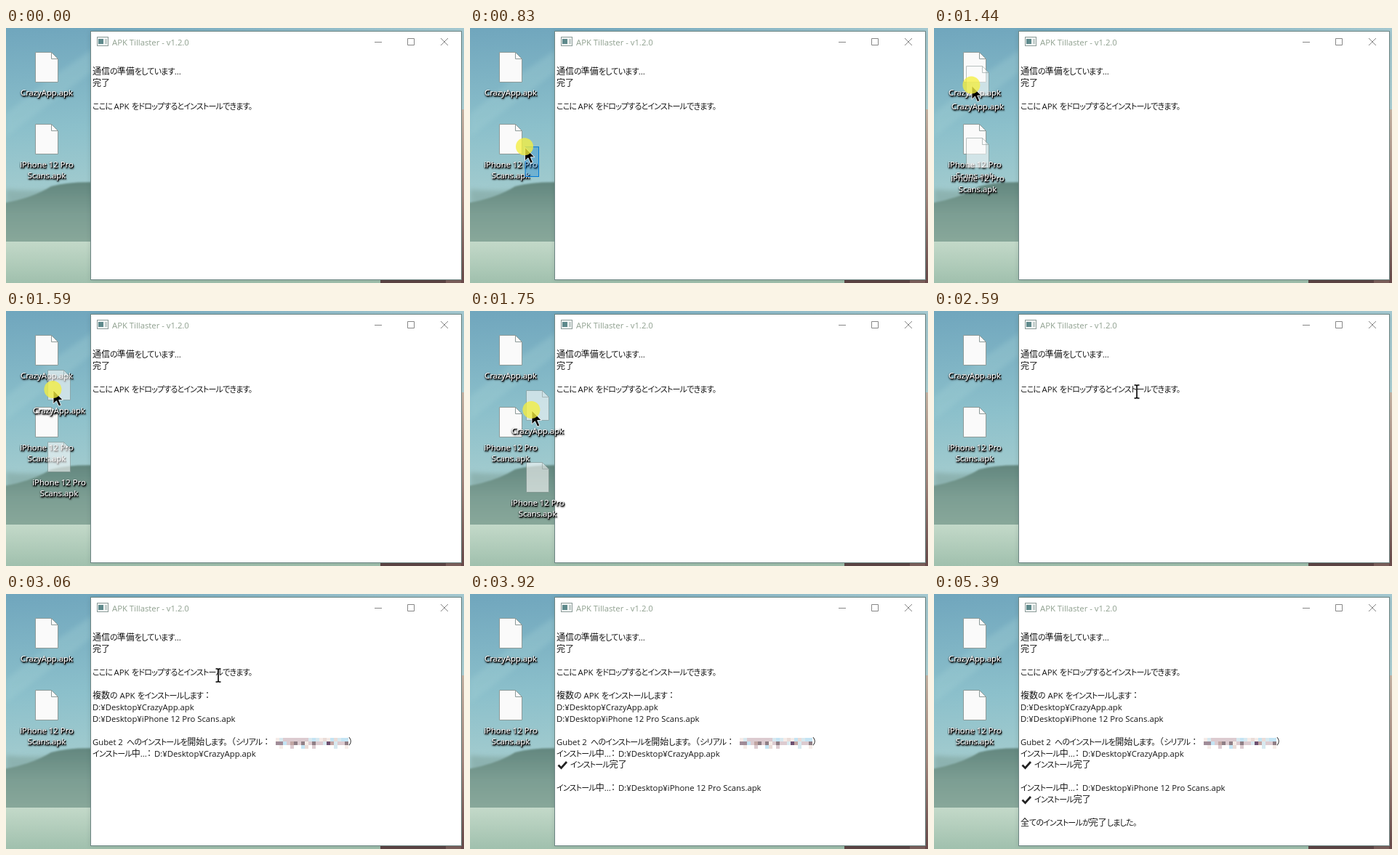
Animation, 630 px wide and 351 px high, one loop 7390 ms. Source, as an HTML page:

```html
<!DOCTYPE html>
<html lang="ja">
<head>
<meta charset="utf-8">
<title>Drag and drop install</title>
<style>
html, body { margin: 0; width: 100%; height: 100%; overflow: hidden; }
svg { display: block; width: 630px; height: 351px; }
text { font: 11.3px 'Open Sans', 'Noto Sans CJK JP', 'Noto Sans CJK', sans-serif; white-space: pre; }
.log text { fill: #161616; }
.kanji { font-size: 12px; }
.kana { font-size: 11px; letter-spacing: -.82px; font-feature-settings: 'palt'; }
.label text {
  fill: #fff; stroke: #fff; stroke-width: .2; text-anchor: middle;
  filter: drop-shadow(1px 1px .6px #000) drop-shadow(.5px 1px 1px #000);
}
#ghost path { opacity: .6; }
</style>
</head>
<body>
<svg id="stage" viewBox="0 0 630 351"></svg>
<script>
const LOOP = 7390, START = 590, TICK = 77.3;

const wrapRuns = s => s
  .replace(/[ぁ-ヿ。]+/g, '<tspan class="kana">$&</tspan>')
  .replace(/[一-龥：（）]+/g, '<tspan class="kanji">$&</tspan>');

// One log line: baseline, then pairs of x and text.
function line(y, ...parts) {
  let out = '';
  for (let i = 0; i < parts.length; i += 2)
    out += `<text x="${parts[i]}" y="${y}">${wrapRuns(parts[i + 1])}</text>`;
  return out;
}

const check = y => `<path d="M121.5 ${y} l4 4 l7.5 -8.5" fill="none" stroke="#222" stroke-width="2.7"/>`;

function file(y, ...names) {
  const page = `<path d="M40.5 ${y + .5} h22 l9 9 v32 h-31 z" fill="#fafafa" stroke="#8d9a98"/>
    <path d="M62.5 ${y + .5} v9 h9" fill="none" stroke="#8d9a98"/>`;
  return page + names.map((n, i) => `<text x="56" y="${y + 59.5 + i * 15}">${n}</text>`).join('');
}

function mosaic() {
  const light = ['#f5ece8', '#d8e9f0', '#eadcd8', '#c4e4f4', '#dccbd0'];
  const dark = ['#a08c98', '#8f7f86', '#c2a6a4', '#6d5070'];
  let seed = 41, out = '';
  const rnd = () => (seed = seed * 16807 % 2147483647) / 2147483647;
  for (let row = 0; row < 3; row++)
    for (let col = 0; col < 20; col++) {
      const tones = row === 1 && rnd() < .6 ? dark : light;
      const tone = tones[Math.floor(rnd() * tones.length)];
      if (row < 2 || rnd() < .15)
        out += `<rect x="${371 + col * 5}" y="${198 + row * 5}" width="5" height="5" fill="${tone}"/>`;
    }
  return out;
}

const files = file(33, 'CrazyApp.apk') + file(132, 'iPhone 12 Pro', 'Scans.apk');
const pathA = 'D:¥Desktop¥CrazyApp.apk', pathB = 'D:¥Desktop¥iPhone 12 Pro Scans.apk';
const arrow = 'M0 0 V17 L4 13.3 L7 20 L9.8 18.8 L7 12.3 H12 Z';

stage.innerHTML = `
<defs>
  <linearGradient id="sky" x1="0" y1="0" x2=".08" y2="1">
    <stop offset="0" stop-color="#70a6bd"/><stop offset=".4" stop-color="#8cc0cb"/>
    <stop offset=".65" stop-color="#a2cbce"/><stop offset="1" stop-color="#a9cdca"/>
  </linearGradient>
  <linearGradient id="haze">
    <stop offset=".2" stop-color="#d5e8e4" stop-opacity="0"/><stop offset="1" stop-color="#d5e8e4" stop-opacity=".5"/>
  </linearGradient>
  <linearGradient id="hill" x1="0" y1="0" x2="0" y2="1">
    <stop offset="0" stop-color="#63877f"/><stop offset=".5" stop-color="#7c9e93"/><stop offset="1" stop-color="#8aa99b"/>
  </linearGradient>
  <linearGradient id="water" x1="0" y1="0" x2="0" y2="1">
    <stop offset="0" stop-color="#c3d9c9"/><stop offset="1" stop-color="#a0c0ad"/>
  </linearGradient>
  <linearGradient id="edge" x1="0" y1="0" x2="0" y2="1">
    <stop offset="0" stop-color="#cdb8a8"/><stop offset=".5" stop-color="#a98a80"/><stop offset="1" stop-color="#6b4a4a"/>
  </linearGradient>
  <filter id="soft"><feGaussianBlur stdDeviation="3"/></filter>
  <filter id="blur"><feGaussianBlur stdDeviation="1"/></filter>
</defs>
<rect width="630" height="351" fill="url(#sky)"/>
<rect width="630" height="351" fill="url(#haze)"/>
<path d="M0 118 L60 70 L118 30 V60 L50 112 L0 150 Z" fill="#a5d2d6" opacity=".3" filter="url(#soft)"/>
<path d="M0 222 Q50 228 130 214 V300 H0 Z" fill="#7fa39d" opacity=".6" filter="url(#soft)"/>
<path d="M-9 242 Q35 235 62 218 Q90 210 140 213 V300 H-9 Z" fill="url(#hill)" filter="url(#blur)"/>
<rect y="294" width="630" height="57" fill="url(#water)"/>
<rect x="515" y="346" width="90" height="5" fill="#5d4444"/>
<rect x="605" y="346" width="25" height="5" fill="#7d5f5b"/>
<rect x="626" y="112" width="4" height="239" fill="url(#edge)"/>
<g class="label">${files}</g>

<rect x="116" y="5" width="512" height="343" fill="#203030" opacity=".15" filter="url(#soft)"/>
<rect x="116.5" y="4.5" width="510" height="342" fill="#fff" stroke="#6d8583"/>
<rect x="125.5" y="12.5" width="15" height="12" fill="#f2f5f4" stroke="#8b9b98"/>
<rect x="127" y="15" width="7" height="7" fill="#5f8a8c"/>
<rect x="136" y="15" width="3" height="7" fill="#c3cecc"/>
<text x="146" y="24" fill="#8fa08f">APK Tillaster - v1.2.0</text>
<path d="M507 19.5 h10 M552.5 14.5 h9 v9 h-9 z M598 14 l10 10 M608 14 l-10 10" fill="none" stroke="#868686"/>

<g class="log">
  ${line(64, 119, '通信の準備をしています...')}
  ${line(80, 119, '完了')}
  ${line(112, 119, 'ここに', 148.5, 'APK', 173, 'をドロップするとインストールできます。')}
  <g id="begin">
    ${line(144, 119, '複数の', 156.5, 'APK', 181, 'をインストールします：')}
    ${line(160, 119, pathA)}
    ${line(176, 119, pathB)}
    ${line(208, 119, 'Gubet 2', 166, 'へのインストールを開始します。', 304, '（シリアル：', 471, '）')}
    ${mosaic()}
    ${line(224, 119, 'インストール中...', 191, '：', 204, pathA)}
  </g>
  <g id="second">
    ${check(235.5)}${line(239, 138, 'インストール完了')}
    ${line(271, 119, 'インストール中...', 191, '：', 204, pathB)}
  </g>
  <g id="done">
    ${check(283.5)}${line(287, 138, 'インストール完了')}
    ${line(319, 119, '全てのインストールが完了しました。')}
  </g>
</g>

<rect id="band" fill="#0078d7" fill-opacity=".28" stroke="#0078d7"/>
<g id="ghost" class="label">${files}</g>
<g id="pointer">
  <path id="dark" d="${arrow}" transform="translate(0 1) scale(1.1)" fill="#000" stroke="#fff" stroke-width=".8"/>
  <g id="copy">
    <path d="${arrow}" fill="#fff" stroke="#000"/>
    <rect x="3.5" y="15.5" width="11" height="8" fill="none" stroke="#000" stroke-width="1.6" stroke-dasharray="1.5 1.5"/>
    <rect x="10.5" y="19.5" width="10" height="10" fill="#fff" stroke="#000"/>
    <path d="M15.5 21.5 v6 M12.5 24.5 h6" stroke="#000" stroke-width="1.2"/>
  </g>
  <path id="beam" d="M-3.5 -9 H-1 L0 -8 L1 -9 H3.5 M0 -8 V8 M-3.5 9 H-1 L0 8 L1 9 H3.5" fill="none" stroke="#000" stroke-width="1.6"/>
  <circle id="press" cx="-.6" r="12" fill="#f4ee40" opacity=".78"/>
</g>`;

// Pointer poses: tick, x, y.
const poses = [
  [0, 94, 204], [2, 88, 190], [7, 26, 56], [9, 19, 41],
  [10, 48, 61.5], [11, 52, 78.5], [13, 65, 108], [15, 85, 136], [16, 99, 139],
  [17, 134, 138], [18, 180, 131], [19, 222, 122], [20, 248, 116], [21, 269, 112], [22, 279, 111],
  [31, 279, 111], [32, 292, 112], [33, 345, 111], [34, 425, 109], [35, 505, 107],
  [36, 553, 106], [37, 553, 106], [38, 608, 110]
];

function poseAt(k) {
  const i = poses.findIndex(p => p[0] >= k);
  if (i < 0) return poses[poses.length - 1].slice(1);
  if (i === 0) return poses[0].slice(1);
  const [ka, xa, ya] = poses[i - 1], [kb, xb, yb] = poses[i];
  const u = (k - ka) / (kb - ka);
  return [xa + (xb - xa) * u, ya + (yb - ya) * u];
}

const el = id => document.getElementById(id);
const show = (id, on) => el(id).setAttribute('display', on ? 'inline' : 'none');
const move = (id, x, y) => el(id).setAttribute('transform', `translate(${x} ${y})`);

function draw(t) {
  const k = Math.floor((t - START + 10) / TICK);
  const [x, y] = poseAt(k);

  show('begin', t >= 2760);
  show('second', t >= 3840);
  show('done', t >= 5390);

  show('pointer', t >= START && t < 3920);
  show('dark', k < 17);
  show('copy', k >= 17 && k < 26);
  show('beam', k >= 26);
  show('press', k < 26);
  move('pointer', x, y);

  show('ghost', k >= 11 && k <= 16);
  move('ghost', Math.round(x - 48), Math.round(y - 60));

  show('band', t >= START && k > 0 && k < 10);
  const size = { x: x + .5, y: y + .5, width: Math.max(0, 94 - x), height: Math.max(0, 204 - y) };
  for (const name in size) el('band').setAttribute(name, size[name]);
}

const origin = performance.now();
function frame() {
  draw((performance.now() - origin) % LOOP);
  requestAnimationFrame(frame);
}
frame();
</script>
</body>
</html>
```
